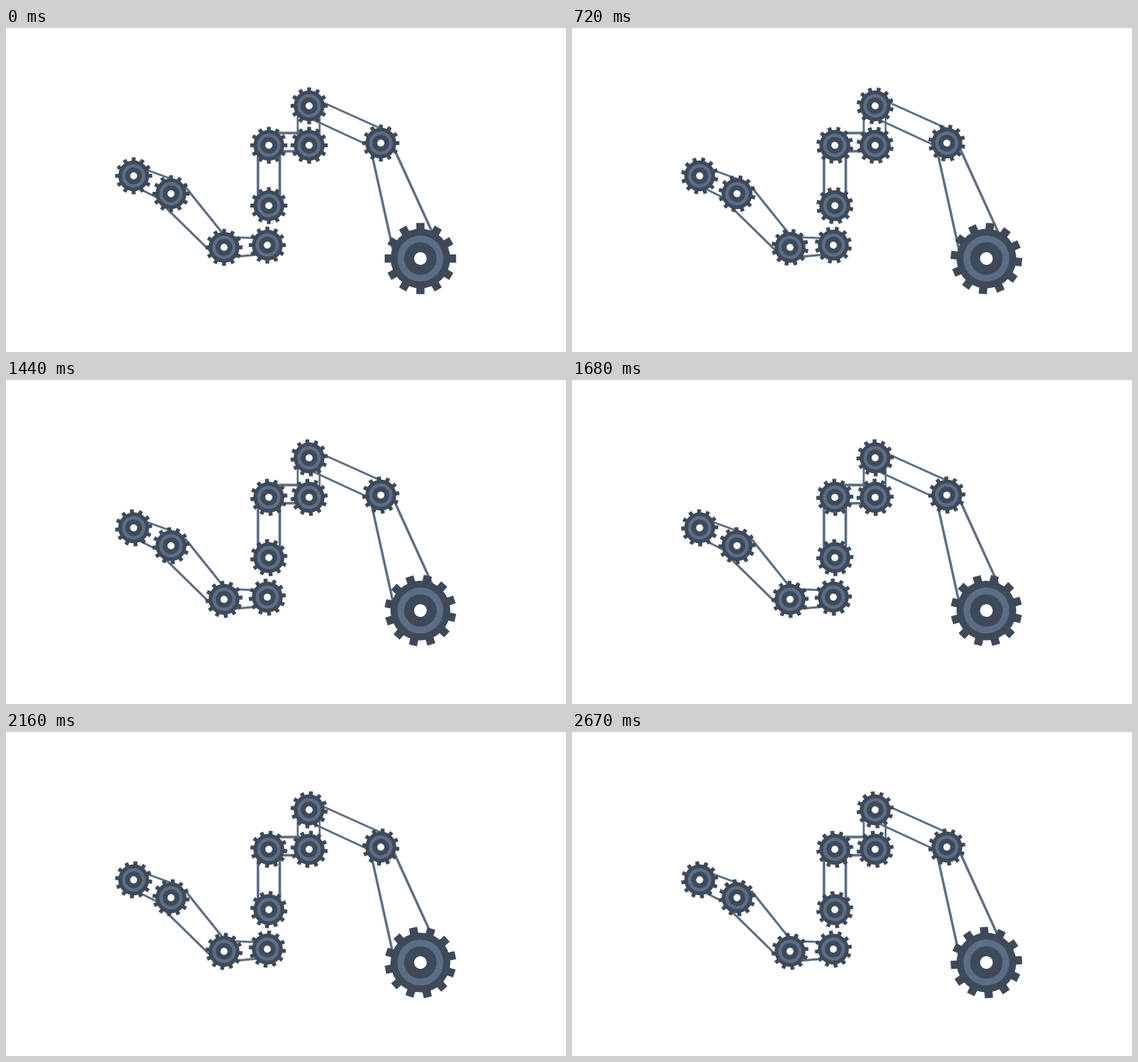
An HTML page for the animation above (2700 ms loop, 750 by 435 pixels).

```html
<!DOCTYPE html>
<html lang="en">
<head>
<meta charset="utf-8">
<title>Gears and belts</title>
<style>
  html, body { margin: 0; width: 100%; height: 100%; overflow: hidden; background: #fff; }
  svg { display: block; width: 100%; height: 100%; }
</style>
</head>
<body>
<svg id="stage" viewBox="0 0 750 435" xmlns="http://www.w3.org/2000/svg"></svg>
<script>
const NS = 'http://www.w3.org/2000/svg';
const DARK = '#3e495a', LIGHT = '#5b6e85';
const LOOP = 2700, STEP = 30;
const stage = document.getElementById('stage');

function add(parent, tag, attrs) {
  const el = document.createElementNS(NS, tag);
  for (const key in attrs) el.setAttribute(key, attrs[key]);
  parent.appendChild(el);
  return el;
}

// Each belt has two strands, followed by its stroke width
const belts = [
  ['M185 189.2L225 204M177 215L207 230', 2.8],
  ['M240 213L291 276.8M210 237.2L275 301', 3],
  ['M304 280.8L336 282.2M302 307.5L340 304', 2.8],
  ['M337.5 163V232M366.7 163V232', 3.5],
  ['M360 141H394M365 165.5H394', 3.3],
  ['M390.7 112V150M420 112V150', 2.6],
  ['M424 99.7L505 136.3M410 122.6L486 157.7', 2.7],
  ['M489.5 167L519 301M517 156L573 279', 3.3]
];
for (const [d, width] of belts) {
  add(stage, 'path', { d, stroke: LIGHT, 'stroke-width': width, fill: 'none' });
}

const small = { tip: 24.8, tooth: 5.2, radii: [20.7, 15.7, 11.2, 4.7], turns: 2 };
const large = { tip: 47.8, tooth: 11, radii: [40, 30.8, 21.8, 8.5], turns: 1 };
const fills = [DARK, LIGHT, DARK, '#fff'];

function makeGear(x, y, kind) {
  const g = add(stage, 'g', {});
  for (let i = 0; i < 12; i++) {
    add(g, 'rect', {
      x: -kind.tooth / 2, y: -kind.tip, width: kind.tooth, height: kind.tip / 2,
      fill: DARK, transform: `rotate(${i * 30})`
    });
  }
  kind.radii.forEach((r, i) => add(g, 'circle', { r, fill: fills[i] }));
  return { g, x, y, turns: kind.turns };
}

const gears = [
  [171, 198.5], [221, 222.5], [292, 294.5], [350, 291.5], [352, 238.5],
  [352, 157.5], [406, 157.5], [406, 104.5], [502, 154.5]
].map(([x, y]) => makeGear(x, y, small));
gears.push(makeGear(555, 309.5, large));

function draw(ms) {
  const phase = Math.floor((ms % LOOP) / STEP) * STEP / LOOP;
  for (const { g, x, y, turns } of gears) {
    g.setAttribute('transform', `translate(${x} ${y}) rotate(${phase * turns * 360})`);
  }
}

const start = performance.now();
function tick() {
  draw(performance.now() - start);
  requestAnimationFrame(tick);
}
draw(0);
requestAnimationFrame(tick);
</script>
</body>
</html>
```
